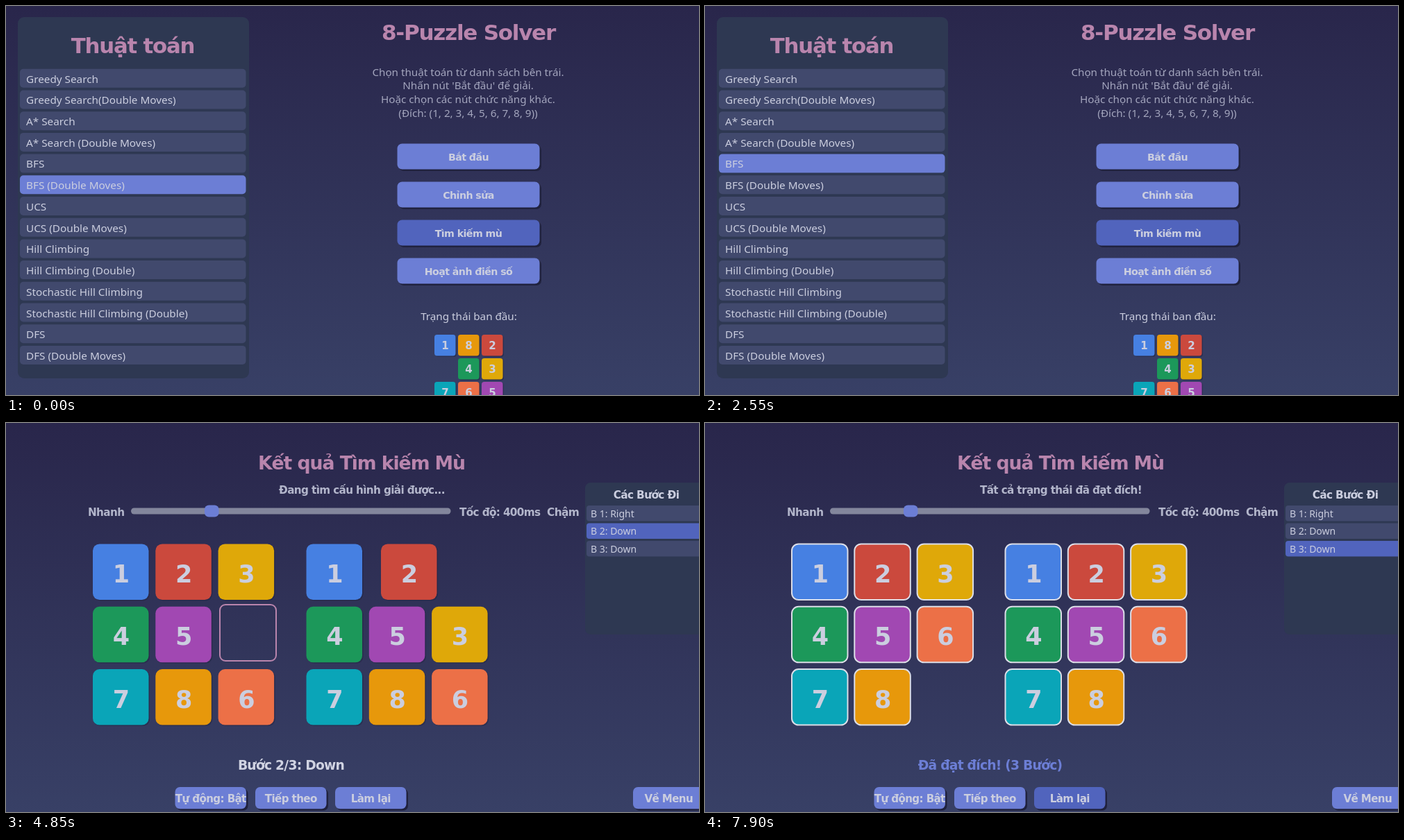
Write an HTML page that moves like this. It is 998x561 px and loops after 8 s.

```html
<!DOCTYPE html>
<html lang="vi">
<head>
<meta charset="utf-8">
<title>8-Puzzle Solver</title>
<style>
  html, body { margin: 0; width: 100%; height: 100%; overflow: hidden; background: #30325a; }
  svg { display: block; width: 998px; height: 561px; }
  text { font-family: "Noto Sans", "Open Sans", sans-serif; fill: #cbcedf; white-space: pre; }
  .b { font-family: "DejaVu Sans", sans-serif; font-weight: bold; letter-spacing: -.04em; }
  .title { fill: #b985ad; }
  .soft { fill: #a4a6be; }
  .label { fill: #b3b6cb; }
</style>
</head>
<body>
<svg id="stage" viewBox="0 0 998 561">
  <defs>
    <linearGradient id="sky" x1="0" y1="0" x2="0" y2="1">
      <stop offset="0" stop-color="#29264b"/>
      <stop offset="1" stop-color="#384066"/>
    </linearGradient>
  </defs>
  <rect width="998" height="561" fill="url(#sky)"/>
  <g id="menu"></g>
  <g id="preview"></g>
  <g id="result"></g>
</svg>
<script>
const LOOP = 8000;
const TIMES = {
  leaveButton: 700, pickRow: 2000, enterButton: 2400,
  preview: 2750, enterStart: 3750, result: 4200,
  firstMove: 4600, moveGap: 400, slide: 310,
  enterNext: 5900, enterAgain: 7350
};
const BLUE = '#6c7ed5', DEEP = '#5164bd', PANEL = '#2e3852', ROW = '#41496d', PINK = '#b985ad';
const TILE = ['', '#4680e2', '#cb493d', '#dfa809', '#1c985a', '#a148b2', '#ec7047', '#0aa5b8', '#e7980b'];
const byId = id => document.getElementById(id);

const rect = (x, y, w, h, r, fill, more = '') =>
  `<rect x="${x}" y="${y}" width="${w}" height="${h}" rx="${r}" fill="${fill}" ${more}/>`;

const text = (x, y, size, str, cls = '', anchor = 'middle', id = '') =>
  `<text x="${x}" y="${y}" font-size="${size}" class="${cls}" text-anchor="${anchor}" id="${id}">${str}</text>`;

const button = (id, x, y, w, h, str, size) =>
  rect(x + 2.5, y + 2.5, w, h, 7, '#20223e') +
  rect(x, y, w, h, 7, BLUE, `id="${id}"`) +
  text(x + w / 2, y + h / 2 + size * .4, size, str, 'b');

const tile = (n, x, y, s, id = '') =>
  `<g id="${id}" transform="translate(${x} ${y})">` +
  rect(1.5, 1.5, s, s, s * .12, '#20223e', 'opacity=".45"') +
  rect(0, 0, s, s, s * .12, TILE[n], 'class="face"') +
  text(s / 2, s * .69, s * .4 + 2.8, n, 'b') + '</g>';

// cells lists the nine places row by row, 0 being the gap
const board = (cells, x, y, s, pitch, prefix = '') =>
  [...cells].map((n, i) => +n
    ? tile(n, x + i % 3 * pitch, y + Math.floor(i / 3) * pitch, s, prefix && prefix + n)
    : '').join('');

const ALGORITHMS = ['Greedy Search', 'Greedy Search(Double Moves)', 'A* Search', 'A* Search (Double Moves)',
  'BFS', 'BFS (Double Moves)', 'UCS', 'UCS (Double Moves)', 'Hill Climbing', 'Hill Climbing (Double)',
  'Stochastic Hill Climbing', 'Stochastic Hill Climbing (Double)', 'DFS', 'DFS (Double Moves)'];
const INTRO = ['Chọn thuật toán từ danh sách bên trái.', "Nhấn nút 'Bắt đầu' để giải.",
  'Hoặc chọn các nút chức năng khác.', '(Đích: (1, 2, 3, 4, 5, 6, 7, 8, 9))'];
const HINT = ['Hai ví dụ về trạng thái ban đầu.', 'Tìm kiếm thực tế sẽ tạo ngẫu nhiên.',
  "Nhấn 'Bắt đầu' để chạy tìm kiếm mù."];
const MOVES = ['Right', 'Down', 'Down'];

byId('menu').innerHTML =
  rect(17, 16, 333, 521, 9, PANEL) +
  text(182.5, 68, 30.8, 'Thuật toán', 'b title') +
  ALGORITHMS.map((name, i) =>
    rect(20, 90.8 + 30.7 * i, 325.5, 27, 5, ROW, `id="row${i}"`) +
    text(29, 110.6 + 30.72 * i, 15.3, name, '', 'start')).join('') +
  text(666, 48.5, 31, '8-Puzzle Solver', 'b title') +
  INTRO.map((line, i) => text(665.5, 100.5 + 19.9 * i, 15.2, line, 'soft')).join('') +
  ['Bắt đầu', 'Chỉnh sửa', 'Tìm kiếm mù', 'Hoạt ảnh điền số'].map((name, i) =>
    button('menuButton' + i, 563.5, 198.5 + 55 * i, 205, 37, name, 14.2)).join('') +
  text(666.5, 452.5, 15.2, 'Trạng thái ban đầu:') +
  board('182043765', 617, 474, 30.5, 34);

byId('preview').innerHTML =
  text(492.5, 74.5, 30.6, 'Xem trước Tìm kiếm Mù', 'b title') +
  HINT.map((line, i) => text(512, 125 + 18 * i, 14, line, 'soft')).join('') +
  text(277.5, 176, 15.4, 'Ví dụ 1') +
  text(706.5, 176, 15.4, 'Ví dụ 2') +
  board('123456708', 118, 196, 101, 108.8) +
  board('123450786', 547, 196, 101, 108.8) +
  button('startButton', 303, 497, 173, 37, 'Bắt đầu Tìm kiếm mù', 14.2) +
  button('previewBack', 508, 497, 135, 37, 'Về Menu', 14.2);

const LEFT = 125, RIGHT = 432.5, TOP = 174.5, SIZE = 80.5, PITCH = 90.3;

byId('result').innerHTML =
  text(512, 67, 26.7, 'Kết quả Tìm kiếm Mù', 'b title') +
  text(512.5, 102, 15.2, '', 'b label', 'middle', 'status') +
  text(118, 133.5, 15.2, 'Nhanh', 'b label', 'start') +
  rect(180, 122.5, 460.5, 9, 4.5, '#83869c') +
  rect(286, 118.5, 20.5, 17, 6, BLUE) +
  text(653, 133.5, 15.2, 'Tốc độ: 400ms', 'b label', 'start') +
  text(779, 133.5, 15.4, 'Chậm', 'b label', 'start') +
  rect(834, 86, 180, 219, 8, PANEL) +
  text(922, 108.5, 15.3, 'Các Bước Đi', 'b') +
  MOVES.map((move, i) =>
    rect(836, 119 + 25.5 * i, 176, 22.5, 4, ROW, `id="step${i}"`) +
    text(842, 135.8 + 25.5 * i, 14, `B ${i + 1}: ${move}`, '', 'start')).join('') +
  board('123450786', LEFT, TOP, SIZE, PITCH, 'left') +
  board('102453786', RIGHT, TOP, SIZE, PITCH, 'right') +
  rect(308, 262, 81, 81, 8, 'none', `id="blocked" stroke="${PINK}" stroke-width="2"`) +
  text(410.5, 500, 18.7, '', 'b', 'middle', 'progress') +
  button('autoButton', 243.5, 525, 102.5, 31.5, 'Tự động: Bật', 15.1) +
  button('nextButton', 359, 525, 102.5, 31.5, 'Tiếp theo', 15.1) +
  button('againButton', 474, 525, 102.5, 31.5, 'Làm lại', 15.1) +
  button('resultBack', 903, 525, 102.5, 31.5, 'Về Menu', 15.1);

const show = (id, on) => byId(id).style.display = on ? '' : 'none';
const fill = (id, color) => byId(id).setAttribute('fill', color);
const hover = (id, on) => fill(id, on ? DEEP : BLUE);

function place(id, left, col, row) {
  byId(id).setAttribute('transform', `translate(${left + col * PITCH} ${TOP + row * PITCH})`);
}

function outline(side, on) {
  for (let n = 1; n < 9; n++) {
    const face = byId(side + n)?.querySelector('.face');
    face?.setAttribute('stroke', on ? '#dcdee8' : 'none');
    face?.setAttribute('stroke-width', 2);
  }
}

function drawMenu(t) {
  const chosen = t < TIMES.pickRow ? 5 : 4;
  ALGORITHMS.forEach((_, i) => fill('row' + i, i === chosen ? BLUE : ROW));
  hover('menuButton2', t < TIMES.leaveButton || t >= TIMES.enterButton);
}

function drawResult(t) {
  const done = MOVES.map((_, i) =>
    Math.min(1, Math.max(0, (t - TIMES.firstMove - i * TIMES.moveGap) / TIMES.slide)));
  const started = done.filter(p => p > 0).length;
  const solved = done[2] === 1;
  const current = Math.min(started, 2);

  place('left6', LEFT, 2, 2 - done[1]);
  place('right2', RIGHT, 2 - done[0], 0);
  place('right3', RIGHT, 2, 1 - done[1]);
  place('right6', RIGHT, 2, 2 - done[2]);
  outline('left', done[1] === 1);
  outline('right', solved);
  show('blocked', started === 1);

  MOVES.forEach((_, i) => fill('step' + i, i === current ? DEEP : ROW));
  byId('status').textContent = solved ? 'Tất cả trạng thái đã đạt đích!' : 'Đang tìm cấu hình giải được...';
  byId('progress').textContent = solved ? 'Đã đạt đích! (3 Bước)' : `Bước ${current + 1}/3: ${MOVES[current]}`;
  byId('progress').style.fill = solved ? BLUE : '#d0d3e2';
  hover('nextButton', t >= TIMES.enterNext && t < TIMES.enterAgain);
  hover('againButton', t >= TIMES.enterAgain);
}

function draw(t) {
  show('menu', t < TIMES.preview);
  show('preview', t >= TIMES.preview && t < TIMES.result);
  show('result', t >= TIMES.result);
  drawMenu(t);
  hover('startButton', t >= TIMES.enterStart);
  drawResult(t);
}

const begin = performance.now();
function tick() {
  draw((performance.now() - begin) % LOOP);
  requestAnimationFrame(tick);
}
tick();
</script>
</body>
</html>
```
